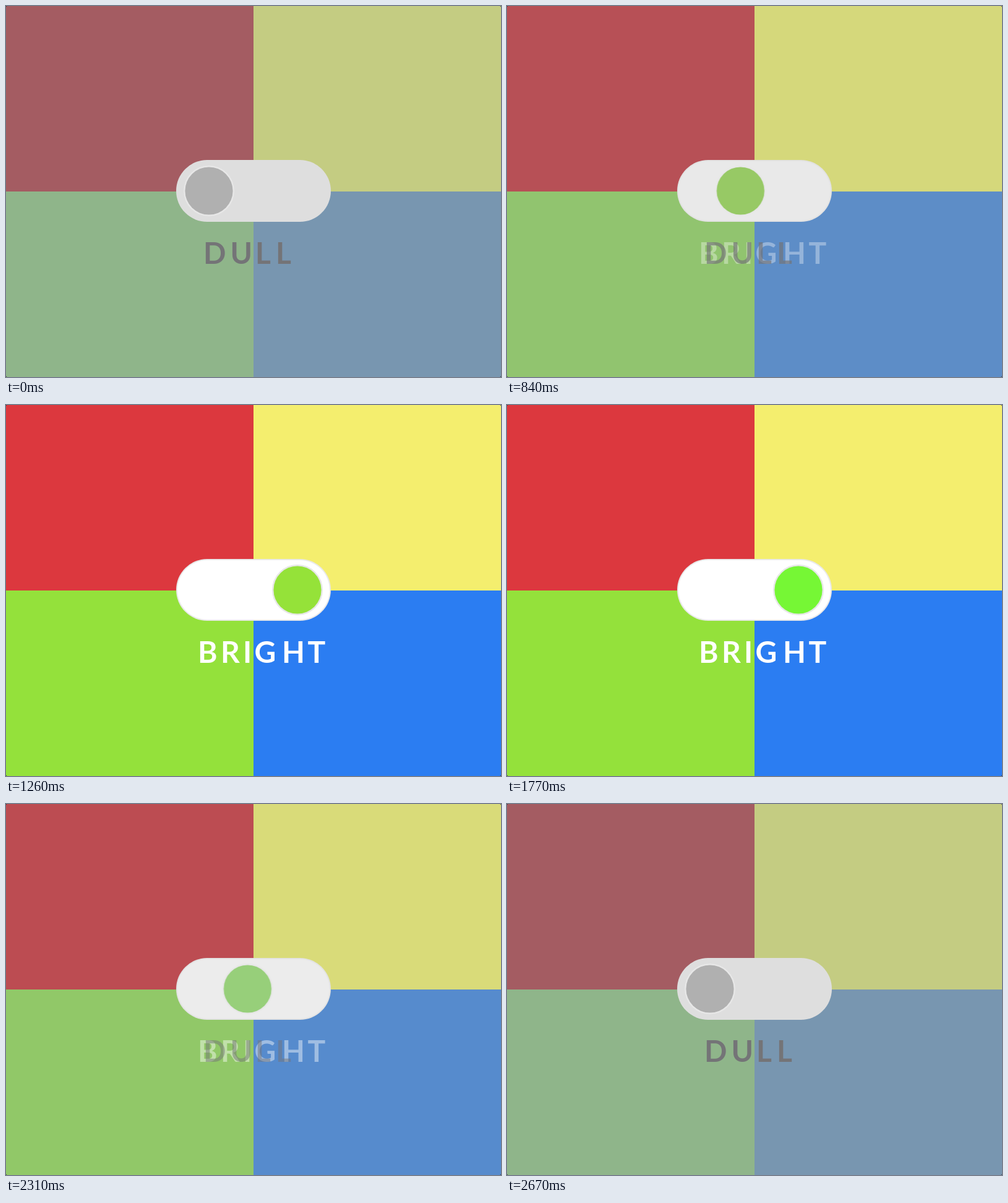
An HTML page that plays this animation: 800 by 600 pixels, repeating every 3060 ms.

```html
<!DOCTYPE html>
<html lang="en">
<head>
<meta charset="utf-8">
<title>Dull / Bright switch</title>
<style>
  html, body { margin: 0; width: 100%; height: 100%; overflow: hidden; background: #222; }
  svg { display: block; width: 800px; height: 600px; border-radius: 2px; }

  /* Each part blends from its dull colour (--a) to its bright one (--b). */
  .tone { animation: tone 3060ms ease-in-out infinite; }
  @keyframes tone {
    0%, 22.88% { fill: var(--a); }
    34.15%, 69.38% { fill: var(--b); }
    80.82%, 100% { fill: var(--a); }
  }

  .red    { --a: #a45c62; --b: #dc383e; }
  .yellow { --a: #c4cc82; --b: #f4ee6e; }
  .green  { --a: #8fb58a; --b: #94e13b; }
  .blue   { --a: #7896b0; --b: #2b7df2; }
  .rim    { --a: #dedede; --b: #e9e9e9; }
  .track  { --a: #dedede; --b: #ffffff; }

  .knob { animation: slide 3060ms ease-in-out infinite; }
  @keyframes slide {
    0%, 22.88% { transform: translateX(0); }
    34.15%, 69.38% { transform: translateX(143px); }
    80.82%, 100% { transform: translateX(0); }
  }

  .face { animation: face 3060ms ease-in-out infinite; }
  @keyframes face {
    0%, 22.88% { fill: #b0b0b0; }
    29.41% { fill: #91cf55; }
    34.15%, 53.92% { fill: #95e239; }
    53.93%, 69.38% { fill: #76f735; }
    80.82%, 100% { fill: #b0b0b0; }
  }

  text { font: 700 48px Lato, sans-serif; }
  .bright { fill: #fff; animation: bright 3060ms ease-in-out infinite; }
  @keyframes bright {
    0%, 22.88% { opacity: 0; }
    34.15%, 69.38% { opacity: 1; }
    80.82%, 100% { opacity: 0; }
  }
  .dull { fill: #747477; animation: dull 3060ms linear infinite; }
  @keyframes dull {
    0%, 26.37% { opacity: 1; }
    29.8%, 73.79% { opacity: 0; }
    77.25%, 100% { opacity: 1; }
  }
</style>
</head>
<body>
<svg viewBox="0 0 800 600">
  <rect class="tone red" width="400" height="300"/>
  <rect class="tone yellow" x="400" width="400" height="300"/>
  <rect class="tone green" y="300" width="400" height="300"/>
  <rect class="tone blue" x="400" y="300" width="400" height="300"/>

  <rect class="tone rim" x="275" y="249" width="250" height="100" rx="50"/>
  <rect class="tone track" x="277" y="251" width="246" height="96" rx="48"/>
  <g class="knob">
    <circle cx="328" cy="299" r="41" fill="#e7e7e7"/>
    <circle class="face" cx="328" cy="299" r="38.6"/>
  </g>

  <text class="bright" y="417" x="310 347 383 401.5 446 487.5">BRIGHT</text>
  <text class="dull" y="417" x="319 362.5 403 436">DULL</text>
</svg>
</body>
</html>
```
